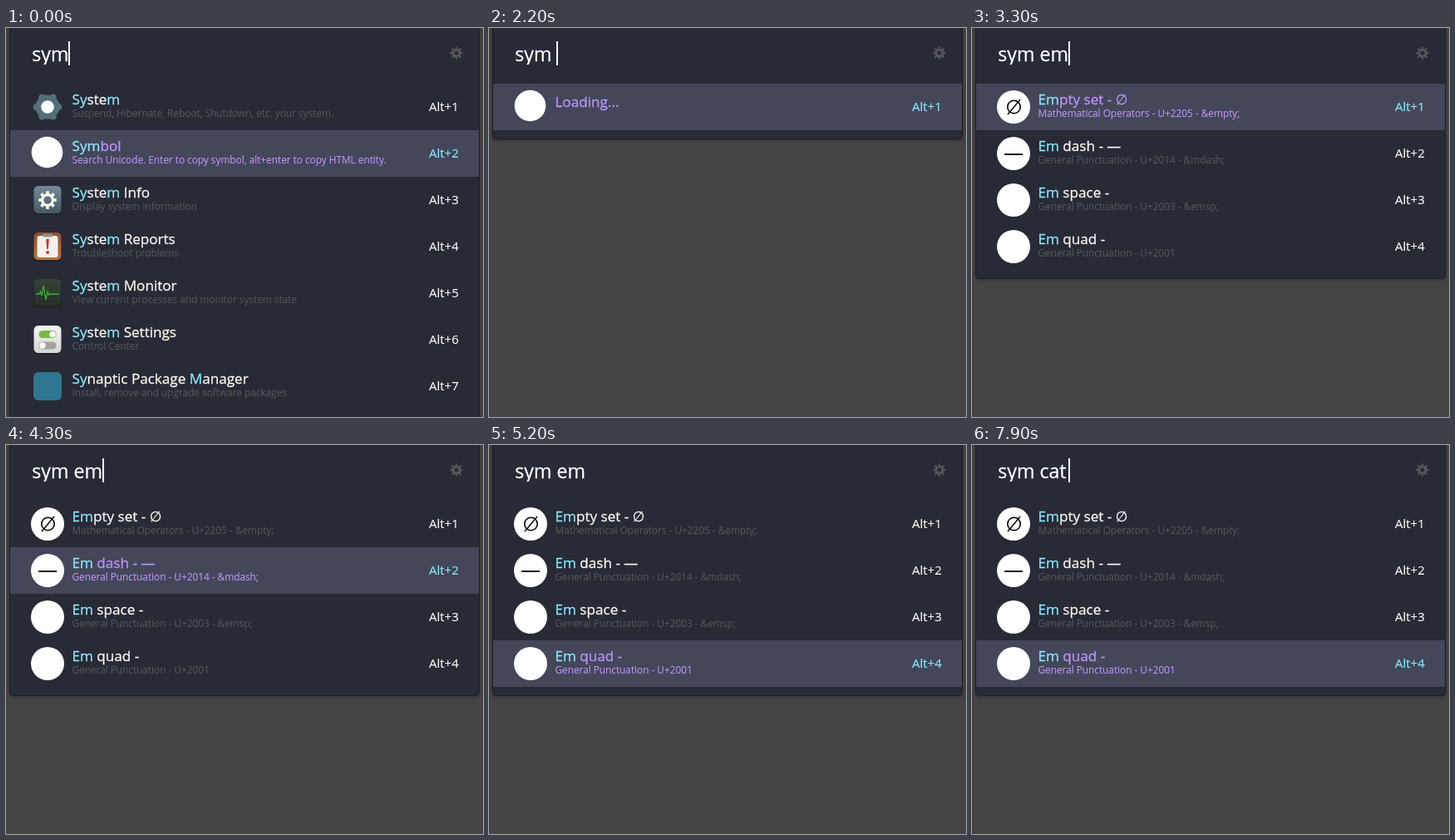
An HTML page for the animation above (8 s loop, 574 by 468 pixels).

```html
<!DOCTYPE html>
<html lang="en">
<head>
<meta charset="utf-8">
<title>Launcher</title>
<style>
  html, body { margin: 0; width: 100%; height: 100%; overflow: hidden; background: #444; }
  svg { display: block; }
  text {
    font-family: "Open Sans", "Noto Sans", "DejaVu Sans", sans-serif;
    white-space: pre;
    fill: currentColor;
    stroke: currentColor;
    stroke-width: .3px;
  }
  tspan { fill: currentColor; stroke: currentColor; }
  #panel { fill: #282a36; stroke: #1d1e26; filter: drop-shadow(0 1px 2px rgba(0, 0, 0, .3)); }
  #query { font-size: 23.1px; color: #fff; }
  .title { font-size: 17.1px; color: #f8f8f2; }
  .note { font-size: 11.8px; color: #555659; stroke-width: .1px; }
  .key { font-size: 15px; color: #f8f8f2; stroke-width: .15px; }
  .bar { fill: none; }
  .selected .bar { fill: #44475a; }
  .selected .title, .selected .note { color: #bd93f9; }
  .hit, .selected .key { color: #8be9fd; }
</style>
</head>
<body>
<svg width="574" height="468" viewBox="0 0 574 468">
  <defs>
    <clipPath id="field"><rect x="25" y="10" width="500" height="34"/></clipPath>
    <linearGradient id="slate" x2="0" y2="1">
      <stop stop-color="#758994"/><stop offset="1" stop-color="#465965"/>
    </linearGradient>
    <linearGradient id="wood" x2="0" y2="1">
      <stop stop-color="#8f5230"/><stop offset="1" stop-color="#b9753f"/>
    </linearGradient>
    <linearGradient id="dark" x2="0" y2="1">
      <stop stop-color="#384038"/><stop offset="1" stop-color="#222b22"/>
    </linearGradient>
    <linearGradient id="light" x2="0" y2="1">
      <stop stop-color="#f4f4f2"/><stop offset="1" stop-color="#d5d5d2"/>
    </linearGradient>
  </defs>
  <rect id="panel" x="4.5" y="-9.5" width="565" rx="4"/>
  <g id="rows"></g>
  <text id="query" x="31.3" y="40" clip-path="url(#field)"></text>
  <rect id="caret" y="16" width="2" height="29" fill="#fff"/>
  <g id="gear"></g>
</svg>
<script>
const LOOP = 8000, ROW = 56, TOP = 67;
const $ = id => document.getElementById(id);

const disc = (x, y, r, fill = '#fff') => `<circle cx="${x}" cy="${y}" r="${r}" fill="${fill}"/>`;
const box = (x, y, w, h, rx, fill) =>
  `<rect x="${x}" y="${y}" width="${w}" height="${h}" rx="${rx}" fill="${fill}"/>`;
const line = (d, color, width) =>
  `<path d="${d}" fill="none" stroke="${color}" stroke-width="${width}"/>`;
const tile = fill => box(33, 11.5, 34, 34, 6, '#1c1f25') + box(33.5, 11, 33, 33, 5.5, fill);

// Ring of eight teeth around an inner ring that leaves a hole
const cog = (x, y, r, hole, color) => {
  const body = r * .76;
  return `<g transform="translate(${x} ${y})" fill="none" stroke="${color}">
    <circle r="${(r + body) / 2}" stroke-width="${r - body + .4}" pathLength="16"
      stroke-dasharray="1" stroke-dashoffset=".5"/>
    <circle r="${(body + hole) / 2}" stroke-width="${body - hole}"/></g>`;
};

const lobes = Array.from({length: 6}, (_, i) => {
  const a = i * Math.PI / 3;
  return disc(50 + 13.3 * Math.cos(a), 28 + 13.3 * Math.sin(a), 4, '#546e7a');
}).join('');

const grid = Array.from({length: 6}, (_, i) => {
  const p = 5 * i;
  return `M${37.5 + p} 12V43M34 ${15.5 + p}H66`;
}).join('');

const pill = (y, color, knob) =>
  box(39.5, y - 4.5, 21, 9, 4.5, color) + disc(knob, y, 3.8, '#fafafa');

const icons = {
  system: lobes + disc(50, 28, 14.5, '#546e7a') + disc(50, 28, 7.8),
  badge: disc(49.5, 26.5, 18.8),
  info: tile('url(#slate)') + cog(50, 28, 10.5, 4.8, '#fff'),
  reports: tile('url(#wood)') + box(37.5, 15, 25, 26, 3, '#f3f1ec') +
    box(44, 12.5, 12, 4, 1.5, '#8d9296') +
    '<path d="M48.2 19H51.8L50.8 31H49.2Z" fill="#d3341f"/>' + disc(50, 35, 1.9, '#d3341f'),
  monitor: tile('url(#dark)') + line(grid, '#334233', .5) +
    line('M36 29H40L41.5 26L43 31L45 19L48 36L50 26L52 30L53.5 29H64', '#2fb535', 1.3),
  settings: tile('url(#light)') + pill(21.5, '#7ab648', 56) + pill(35, '#a3a3a0', 44),
  packages: box(33, 11, 34, 34, 6, '#2f7690'),
  empty: disc(50, 28, 20) + '<circle cx="50.5" cy="28" r="7.7" fill="none" stroke="#000" stroke-width="1.6"/>' +
    line('M43 37L58 19', '#000', 1.4),
  dash: disc(50, 28, 20) + line('M39 29H61', '#000', 1.8),
  blank: disc(50, 28, 20)
};

// Each item: icon, title with matched letters in brackets, note
const lists = {
  apps: [
    ['system', '[Sy]ste[m]', 'Suspend, Hibernate, Reboot, Shutdown, etc. your system.'],
    ['badge', '[Sym]bol', 'Search Unicode. Enter to copy symbol, alt+enter to copy HTML entity.'],
    ['info', '[Sy]ste[m] Info', 'Display system information'],
    ['reports', '[Sy]ste[m] Reports', 'Troubleshoot problems'],
    ['monitor', '[Sy]ste[m] Monitor', 'View current processes and monitor system state'],
    ['settings', '[Sy]ste[m] Settings', 'Control Center'],
    ['packages', '[Sy]naptic Package [M]anager', 'Install, remove and upgrade software packages']
  ],
  loading: [['badge', 'Loading...', '']],
  symbols: [
    ['empty', '[Em]pty set - ∅', 'Mathematical Operators - U+2205 - &amp;empty;'],
    ['dash', '[Em] dash - —', 'General Punctuation - U+2014 - &amp;mdash;'],
    ['blank', '[Em] space - ', 'General Punctuation - U+2003 - &amp;emsp;'],
    ['blank', '[Em] quad - ', 'General Punctuation - U+2001']
  ]
};

const typed = (query, caret) => ({query, caret, on: true});
const caretOn = {on: true}, caretOff = {on: false};
const steps = [
  [0, {...typed('sym', 75), list: 'apps', selected: 1}],
  [100, caretOff], [500, caretOn], [1300, caretOff], [1700, caretOn],
  [1800, typed('sym ', 81)],
  [2200, {list: 'loading', selected: 0}],
  [2300, typed('sym e', 94)],
  [2400, typed('sym em', 116)],
  [3300, {list: 'symbols'}],
  [3700, caretOff], [4100, caretOn],
  [4300, {selected: 1}], [4800, {selected: 2}],
  [4900, caretOff],
  [5200, {selected: 3}],
  [5300, caretOn], [6100, caretOff], [6500, caretOn], [7300, caretOff],
  [7400, typed('sym e', 94)],
  [7500, typed('sym ', 81)],
  [7700, typed('sym c', 93)],
  [7800, typed('sym ca', 106)],
  [7900, typed('sym cat', 116)]
];

const rowMarkup = ([icon, title, note], i, selected) => `
  <g transform="translate(0 ${TOP + ROW * i})" class="${i === selected ? 'selected' : ''}">
    <rect class="bar" x="5" width="564" height="${ROW}"/>${icons[icon]}
    <text class="title" x="79.5" y="${note ? 25 : 28}">${
      title.replace(/\[(.+?)\]/g, '<tspan class="hit">$1</tspan>')}</text>
    <text class="note" x="79.5" y="40">${note}</text>
    <text class="key" x="509" y="33">Alt+${i + 1}</text>
  </g>`;

let shownRows = '', shownStep = -1;

function draw(time) {
  const past = steps.filter(([start]) => start <= time);
  if (past.length === shownStep) return;
  shownStep = past.length;
  const state = Object.assign({}, ...past.map(([, change]) => change));
  const items = lists[state.list];

  $('query').textContent = state.query;
  $('caret').setAttribute('x', state.caret);
  $('caret').setAttribute('visibility', state.on ? 'visible' : 'hidden');
  const rowsKey = state.list + state.selected;
  if (rowsKey === shownRows) return;
  shownRows = rowsKey;
  $('panel').setAttribute('height', TOP + ROW * items.length + 20);
  $('rows').innerHTML = items.map((item, i) => rowMarkup(item, i, state.selected)).join('');
}

$('gear').innerHTML = cog(542, 30, 7.4, 2.5, '#555659');
const origin = performance.now();
function tick() {
  draw((performance.now() - origin) % LOOP);
  requestAnimationFrame(tick);
}
tick();
</script>
</body>
</html>
```
